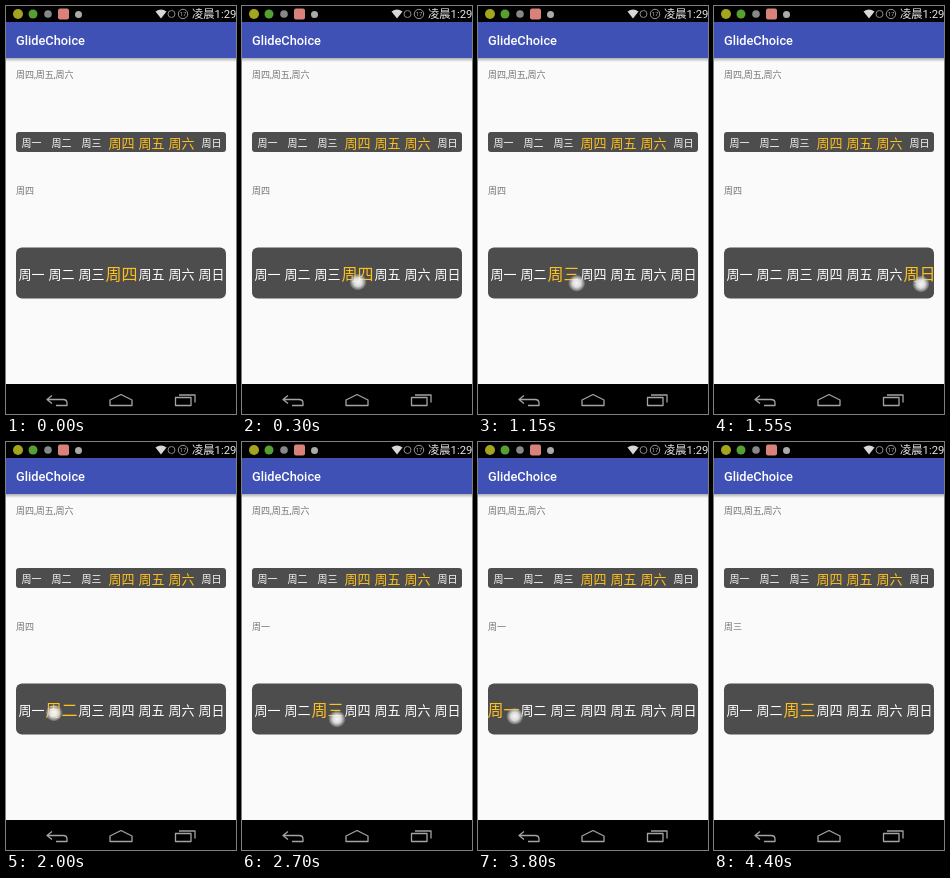
These frames come from a looping animation (230 by 408 pixels, 4.45 s). An HTML page:

```html
<!DOCTYPE html>
<html lang="zh-CN">
<head>
<meta charset="utf-8">
<style>
html, body { margin: 0; width: 100%; height: 100%; overflow: hidden; background: #fafafa; }
svg { display: block; width: 230px; height: 408px; }
text { font-family: Roboto, "Noto Sans CJK SC", "Noto Sans CJK", sans-serif; }
.line { fill: none; stroke: #a3a3a3; stroke-width: 1.3; stroke-linejoin: round; }
</style>
</head>
<body>
<svg viewBox="0 0 230 408">
  <defs>
    <linearGradient id="shade" x2="0" y2="1">
      <stop stop-color="#000" stop-opacity=".3"/>
      <stop offset="1" stop-color="#000" stop-opacity="0"/>
    </linearGradient>
    <radialGradient id="glow">
      <stop stop-color="#fff" stop-opacity=".95"/>
      <stop offset=".5" stop-color="#f4f4f4" stop-opacity=".85"/>
      <stop offset=".75" stop-color="#ccc" stop-opacity=".65"/>
      <stop offset="1" stop-color="#aaa" stop-opacity=".25"/>
    </radialGradient>
  </defs>
  <rect width="230" height="408" fill="#fafafa"/>

  <!-- status bar -->
  <rect width="230" height="16"/>
  <circle cx="12" cy="8" r="5" fill="#a3a51d"/>
  <circle cx="27" cy="8" r="4.5" fill="#55a030"/>
  <circle cx="42" cy="8" r="3.8" fill="#888"/>
  <rect x="52" y="2.5" width="11" height="11" rx="2" fill="#d9827a"/>
  <circle cx="72.500" cy="8.500" r="3.500" fill="#aaa"/>
  <path d="M149.500 5.500Q155 1.500 160.500 5.500L155 12.500Z" fill="#d8d8d8"/>
  <circle cx="165.500" cy="8" r="3.500" fill="none" stroke="#888"/>
  <circle cx="177" cy="8" r="4.700" fill="none" stroke="#999"/>
  <text x="177" y="10.300" font-size="6" fill="#aaa" text-anchor="middle">17</text>
  <text x="186" y="12" font-size="11.300" fill="#e4e4e4">凌晨1:29</text>

  <!-- title bar -->
  <rect y="16" width="230" height="36" fill="#3f51b5"/>
  <rect y="52" width="230" height="4" fill="url(#shade)"/>
  <text x="10" y="39" font-size="12.800" font-weight="500" fill="#fff">GlideChoice</text>

  <text x="10" y="71.800" font-size="9" fill="#757575">周四,周五,周六</text>
  <rect x="10" y="126" width="210" height="20" rx="3" fill="#4d4d4d"/>
  <g id="many"></g>

  <text id="label" x="10" y="187.500" font-size="9" fill="#757575"></text>
  <rect x="10" y="241.500" width="210" height="51" rx="6" fill="#4d4d4d"/>
  <g id="single"></g>
  <circle id="touch" r="8.300" fill="url(#glow)"/>

  <!-- navigation bar -->
  <rect y="378" width="230" height="30"/>
  <path class="line" d="M46 389.500L41 393.500L46 397.500M41.500 393.500H57Q61 393.500 61 397V399.500H50"/>
  <path class="line" d="M104 399.500V394L115 388.500L126 394V399.500Z"/>
  <path class="line" d="M169.500 391.500H185V399.500H169.500ZM173 389H189V396.500"/>
</svg>
<script>
const LOOP = 4450, STEP = 50, LAG = 30;
const days = [...'一二三四五六日'].map(d => '周' + d);
const get = id => document.getElementById(id);

// finger strokes: [time, x, y]
const strokes = [
  [[300, 116, 276], [600, 122, 277], [700, 125, 277], [850, 52, 275], [940, 24, 274],
   [1000, 35, 275], [1100, 85, 277], [1300, 140, 278], [1450, 192, 278], [1550, 207, 278],
   [1600, 200, 277], [1650, 180, 276], [1900, 68, 272], [2000, 48, 271], [2130, 25, 272], [2250, 24, 273]],
  [[2400, 26, 275], [2550, 45, 276], [2700, 95, 277], [2750, 112, 277], [3150, 180, 275],
   [3200, 197, 274], [3300, 208, 274], [3400, 190, 274], [3550, 120, 274], [3700, 30, 274],
   [3780, 30, 274], [3850, 54, 275], [4000, 78, 276], [4200, 86, 277]]
];

function fingerAt(t) {
  const stroke = strokes.find(s => t >= s[0][0] && t < s.at(-1)[0]);
  if (!stroke) return null;
  const i = stroke.findIndex(p => p[0] > t);
  const [a, b] = [stroke[i - 1], stroke[i]];
  const k = (t - a[0]) / (b[0] - a[0]);
  return { x: a[1] + (b[1] - a[1]) * k, y: a[2] + (b[2] - a[2]) * k };
}

const dayAt = x => Math.max(0, Math.min(6, Math.floor((x - 10) / 30)));

function pickedAt(t) {
  const finger = fingerAt(t - LAG);
  if (finger) return dayAt(finger.x);
  return t < 1000 ? 3 : t < 3000 ? 0 : 2;
}

function makeRow(id) {
  return days.map((day, i) => {
    const el = document.createElementNS('http://www.w3.org/2000/svg', 'text');
    el.textContent = day;
    el.setAttribute('x', 25.5 + 30 * i);
    el.setAttribute('text-anchor', 'middle');
    get(id).append(el);
    return el;
  });
}

function styleRow(row, cy, small, big, isOn) {
  row.forEach((el, i) => {
    const size = isOn(i) ? big : small;
    el.setAttribute('font-size', size);
    el.setAttribute('y', cy + size * 0.37);
    el.setAttribute('fill', isOn(i) ? '#ffc11e' : '#fff');
  });
}

styleRow(makeRow('many'), 137, 10, 13, i => i > 2 && i < 6);
const single = makeRow('single');
const label = get('label'), touch = get('touch');

function draw(now) {
  const t = Math.floor(now % LOOP / STEP) * STEP;
  const picked = pickedAt(t);
  styleRow(single, 268.5, 13, 16, i => i === picked);
  label.textContent = days[t < 2250 ? 3 : t < 4200 ? 0 : 2];
  const finger = fingerAt(t);
  touch.setAttribute('visibility', finger ? 'visible' : 'hidden');
  if (finger) {
    touch.setAttribute('cx', finger.x);
    touch.setAttribute('cy', finger.y);
  }
}

const start = performance.now();
function tick() {
  draw(performance.now() - start);
  requestAnimationFrame(tick);
}
tick();
</script>
</body>
</html>
```
